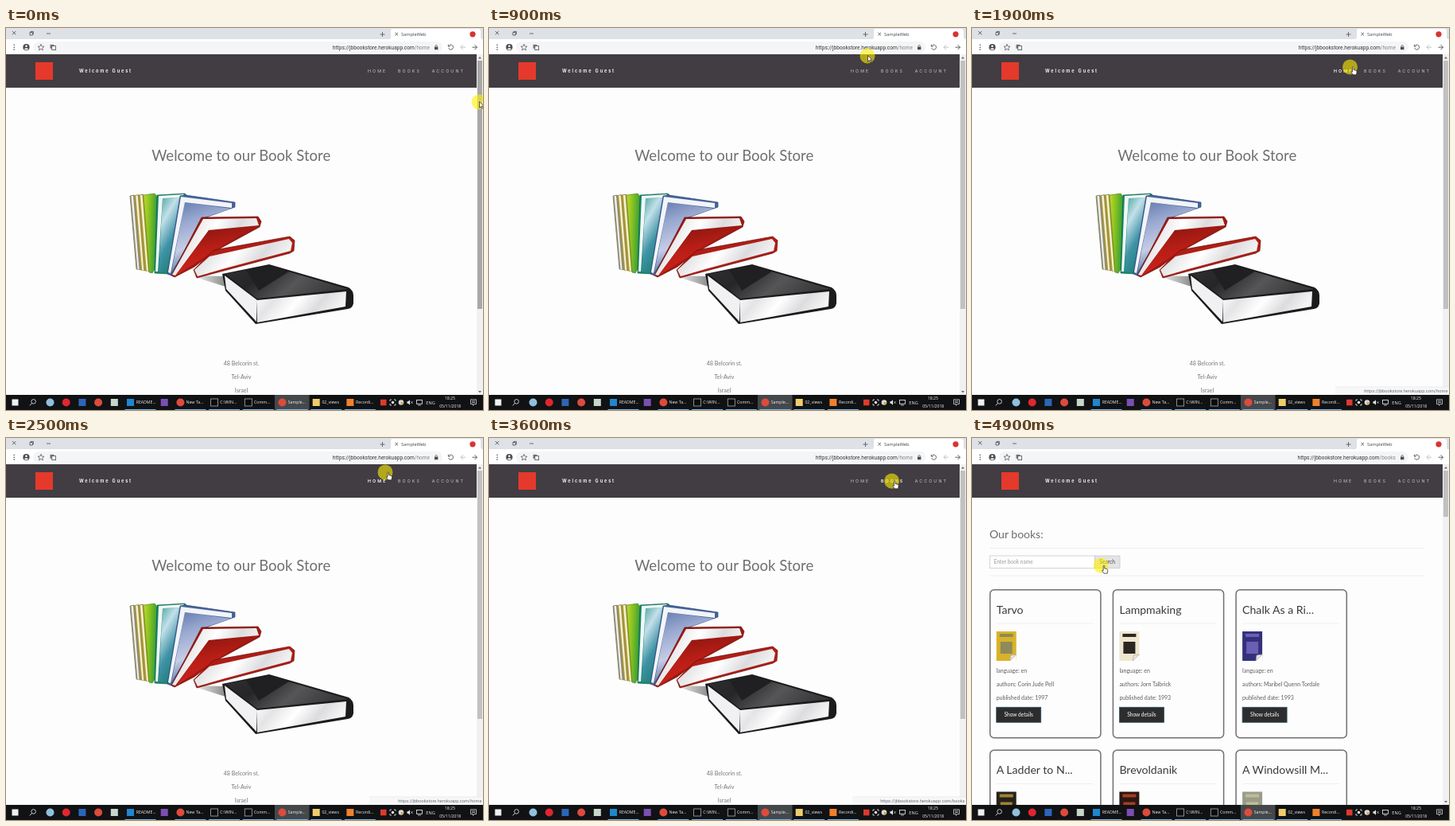
Recreate the animation shown at these times as an HTML page. Size 600x480 px, loop 5000 ms.

```html
<!DOCTYPE html>
<html lang="en">
<head>
<meta charset="utf-8">
<title>Book Store</title>
<style>
html, body { margin: 0; width: 100%; height: 100%; overflow: hidden; background: #fdfdfd; }
svg { display: block; width: 600px; height: 480px; }
text { font-family: Lato, sans-serif; }
.ui { font-family: "Open Sans", sans-serif; }
.url { font-family: Roboto, sans-serif; }
.nav { font-family: Inter, sans-serif; letter-spacing: 2.1px; }
.guest { font-family: Inter, sans-serif; letter-spacing: 1.9px; font-weight: 700; }
</style>
</head>
<body>
<svg id="stage" viewBox="0 0 600 480" xmlns="http://www.w3.org/2000/svg">
<defs id="paints"></defs>
<g id="home"></g>
<g id="books"></g>
<g id="frame"></g>
<g id="status"></g>
<g id="bar"></g>
<g id="pointer">
  <circle r="9.5" fill="#fff000" fill-opacity=".6"/>
  <path id="arrow" d="M.5 -.5V7.2L2.2 5.6L3.4 8.3L4.6 7.8L3.4 5.1H5.8Z" fill="#fff" stroke="#222" stroke-width=".7"/>
  <path id="hand" d="M3 .2Q4 -.8 4.6 .4V3.6L7.6 4.4Q8.8 4.8 8.6 6.2L8 9.8H3.8L1.2 6.2Q1.4 5.2 3 6.2Z" fill="#fff" stroke="#222" stroke-width=".7"/>
</g>
</svg>
<script>
const LOOP = 5000, STEP = 100, NAVIGATE = 4000, LOADED = 4500;
const HOST = "https://jbbookstore.herokuapp.com";
const $ = id => document.getElementById(id);

const attrs = o => Object.entries(o).map(([k, v]) => ` ${k}="${v}"`).join("");
const rect = (x, y, width, height, fill, more = {}) =>
  `<rect${attrs({ x, y, width, height, fill, ...more })}/>`;
const dot = (cx, cy, r, fill) => `<circle${attrs({ cx, cy, r, fill })}/>`;
const poly = (points, fill, stroke = "none") =>
  `<polygon${attrs({ points, fill, stroke, "stroke-width": 0.7 })}/>`;
const line = (d, stroke, width = 1) =>
  `<path${attrs({ d, stroke, fill: "none", "stroke-width": width })}/>`;
const text = (x, y, size, fill, str, more = {}) =>
  `<text${attrs({ x, y, "font-size": size, fill, ...more })}>${str}</text>`;
const edged = stroke => ({ stroke, "stroke-width": 0.8 });
const mid = { "text-anchor": "middle" };
const end = { "text-anchor": "end" };
const ui = { class: "ui" };

// Evenly spaced stops along the direction (x2, y2)
const gradient = (id, x2, y2, ...colors) =>
  `<linearGradient${attrs({ id, x2, y2 })}>` + colors.map((c, i) =>
    `<stop offset="${i / (colors.length - 1)}" stop-color="${c}"/>`).join("") + "</linearGradient>";

$("paints").innerHTML =
  gradient("lime", 1, 0.2, "#c6d92a", "#7fbe22", "#2f9a3a") +
  gradient("teal", 0.5, 1, "#3f9f96", "#c3e0ea", "#3f93a6", "#1f7f78") +
  gradient("blue", 0.3, 1, "#5f78ac", "#9aa9d0", "#c5cde6", "#54709f") +
  gradient("red", 0.3, 1, "#86160f", "#b81e16", "#cf241b") +
  gradient("page", 1, 0.3, "#fff", "#e4e4e6", "#fff", "#dcdcdf", "#f6f6f6") +
  gradient("black", 1, 0.3, "#303032", "#262628", "#565658", "#3a3a3c") +
  gradient("shade", 1, 0, "#fdfdfd", "#8b8b8b");

function thinBook(color, i) {
  const x = 156 + i * 5.7, y = 211 - i / 2, foot = 304 + i;
  return poly(`${x},${y} ${x + 5},${y - 1} ${x + 13},${foot} ${x + 8},${foot - 1}`, color, "#7c7440") +
    poly(`${x + 1.5},${y} ${x + 4},${y} ${x + 11.5},${foot} ${x + 9.5},${foot - 1}`, "#f3f1e2");
}

function bookPile() {
  return poly("232,311 275,312 276,325", "url(#shade)") +
    ["#8d9092", "#b9a02a", "#c4a71d"].map(thinBook).join("") +
    poly("173,210 187,208 191,213 189,300 184,308 180,307", "url(#lime)", "#4f8a1c") +
    poly("190,210 225,208 229,212 205,309 187,308", "#178a6d", "#0d5d4b") +
    poly("197,214 220,213 204,307 192,306", "url(#teal)") +
    poly("192,211 224,209 221,213 197,214 191,306 188,306", "#f1f7f6") +
    poly("219,211 226,210 288,219 288,225 254,237 208,311 203,309", "#46659c", "#2d4675") +
    poly("225,219 283,227 250,238 208,307", "url(#blue)") +
    poly("220,212 284,220 284,226 225,219 207,308 204,307", "#f2f4f8") +
    poly("246,238 317,237 321,243 319,250 262,281 237,300 212,313 208,311", "#a01912", "#5d0d09") +
    poly("254,254 308,252 262,280 214,311", "url(#red)") +
    poly("248,240 315,239 318,248 255,254 213,311 209,310", "url(#page)") +
    poly("262,279 357,262 363,267 362,280 357,283 240,314 236,304 255,285", "#b01d15", "#5d0d09") +
    poly("256,287 356,265 360,270 358,280 272,303 241,312 237,304", "url(#page)") +
    `<path d="M272 309L331 297L431 326Q437 330 437 336V346Q436 352 430 353L314 372L276 330Z" fill="#1b1b1c"/>` +
    poly("276,309 331,299 430,328 316,340", "url(#black)") +
    poly("302,304 331,299 356,306 318,330", "#202022") +
    poly("316,342 428,331 427,350 316,370", "url(#page)") +
    poly("275,311 316,342 315,369 277,328", "#f1f1f3");
}

function homePage() {
  return text(295.7, 167.3, 18.55, "#707070", "Welcome to our Book Store", mid) + bookPile() +
    ["48 Belcorin st.", "Tel-Aviv", "Israel"].map((s, i) =>
      text(296, 423.8 + i * 17.2, 7.1, "#777", s, mid)).join("");
}

const shelf = [
  { title: "Tarvo", by: "Corin Jude Pell", year: 1997, base: "#d8b32a", art: "#8f8a5a" },
  { title: "Lampmaking", by: "Jorn Talbrick", year: 1993, base: "#efe6cf", art: "#2b2622" },
  { title: "Chalk As a Ri...", by: "Maribel Quenn Tordale", year: 1993, base: "#35307c", art: "#6b5fb4" },
  { title: "A Ladder to N...", base: "#25221c", art: "#a08232" },
  { title: "Brevoldanik", base: "#2a1714", art: "#a83c24" },
  { title: "A Windowsill M...", base: "#9a9c8b", art: "#c0bd94" }
];

function cover({ base, art }, x, y) {
  const w = 25, h = 37, r = x + w, b = y + h;
  return rect(x, y, w, h, base) + rect(x + 4, y + 3, w - 8, 4, art) +
    rect(x + 5, y + 13, w - 10, 15, art) +
    poly([r, b - 8, r, b, r - 8, b], "#fdfdfd") +
    poly([r, b - 8, r - 7, b - 7, r - 8, b], "#e9e6dc", "#aaa");
}

function card(b, i) {
  const x = 22.7 + (i % 3) * 154.7, y = 190.7 + Math.floor(i / 3) * 201.5, left = x + 8;
  const facts = ["language: en", "authors: " + b.by, "published date: " + b.year];
  return rect(x, y, 139.2, 186, "#fdfdfd", { rx: 5, stroke: "#6f6f73", "stroke-width": 1.5 }) +
    text(left, y + 30.2, 14.1, "#3a3a3a", b.title) +
    rect(left, y + 42, 122, 0.7, "#e8e8e8") + cover(b, left, y + 52.3) +
    facts.map((s, n) => text(left, y + 104 + n * 17, 7, "#5c5c5c", s)).join("") +
    rect(left, y + 147.6, 56, 19, "#2d2d2e", edged("#2c5262")) +
    text(left + 28, y + 159.6, 6.6, "#fff", "Show details", mid);
}

function booksPage() {
  const rule = y => rect(22, y, 546, 0.7, "#e9e9e9");
  return text(22, 126, 14, "#6d6d6d", "Our books:") + rule(138) + rule(172.7) +
    rect(22.4, 148, 132, 15.4, "#fff", edged("#c8c8c8")) +
    text(27.5, 158.2, 6.6, "#999", "Enter book name") +
    rect(154.4, 148, 31.6, 15.4, "#ebebeb", { id: "find", ...edged("#c8c8c8") }) +
    text(170.2, 158, 6.7, "#444", "Search", mid) +
    `<g id="cards">${shelf.map(card).join("")}</g>`;
}

const cross = (x, y, r, width) =>
  line(`M${x - r} ${y - r}l${2 * r} ${2 * r}m0 ${-2 * r}l${-2 * r} ${2 * r}`, "#444", width);

// Horizontal arrow pointing along dir (1 or -1)
const arrow = (x, dir, color) =>
  line(`M${x - 3 * dir} 24.2h${6 * dir}m${-3 * dir} -3l${3 * dir} 3l${-3 * dir} 3`, color, 0.9);

function star(cx, cy, r) {
  const at = i => {
    const a = i * Math.PI / 5, d = i % 2 ? r * 0.45 : r;
    return [cx + d * Math.sin(a), cy - d * Math.cos(a)];
  };
  return poly(Array.from({ length: 10 }, (_, i) => at(i)).join(" "), "none", "#4a4d51");
}

function browser() {
  const ink = "#4a4d51";
  return rect(0, 0, 600, 14, "#dee1e6") +
    `<path d="M482 14Q484 14 484 11V3Q484 1 487 1H594Q597 1 597 4V11Q597 14 599 14Z" fill="#fff"/>` +
    rect(0, 14, 600, 19, "#fff") + rect(34, 17, 515, 14, "#f4f5f6", { rx: 7 }) +
    cross(10.2, 6.2, 2.2, 0.8) + cross(491.2, 7.6, 1.8, 0.8) +
    line("M30 5.5H33.3V9H30ZM31 5.5V4.4H34.4V7.8H33.3M51 7H56M470.5 8H476.5M473.5 5V11", ink, 0.8) +
    text(497, 10, 5.7, "#44474b", "SampleWeb", ui) + dot(587, 7.8, 3.6, "#d7342f") +
    [-1, 0, 1].map(i => dot(10.2, 24.2 + i * 2.9, 0.8, ink)).join("") +
    dot(25.5, 24.2, 4.1, ink) + dot(25.5, 22.8, 1.3, "#fff") +
    `<path d="M22.8 26.5Q25.5 23.8 28.2 26.5Q25.5 28.6 22.8 26.5Z" fill="#fff"/>` +
    star(44, 24.5, 4.2) +
    rect(55.5, 20.8, 4.8, 5, "#777") + rect(57.8, 22.6, 4.8, 5, "#fff", edged(ink)) +
    text(533, 26.6, 6.55, "#33363a", "", { ...end, class: "url", id: "address" }) +
    rect(539, 23.6, 4.4, 3.6, ink) + line("M540 23.6V22.2Q541.2 20.6 542.4 22.2V23.6", ink, 0.7) +
    line("M557 22.5A3 3 0 1 1 556.7 25.2M556.4 20.8V23.2H558.8", ink, 0.9) +
    arrow(575, -1, "#b9bbbe") + arrow(589.5, 1, ink);
}

const links = [
  { label: "HOME", x: 455, w: 24, path: "/home" },
  { label: "BOOKS", x: 493, w: 28, path: "/books" },
  { label: "ACCOUNT", x: 535.7, w: 39, path: "/account" }
];

function header() {
  return rect(0, 33, 592, 42, "#413d43") + rect(37, 43, 22, 22, "#e5392c") +
    text(92, 56, 5.5, "#f2f2f2", "Welcome Guest", { class: "guest" }) +
    links.map((l, i) => text(l.x, 56.2, 5.3, "#c9c7ca", l.label, { class: "nav", id: "link" + i })).join("");
}

function scrollbar() {
  return rect(592, 33, 8, 428, "#f1f1f1") + rect(593, 41, 6, 312, "#c1c1c1", { id: "thumb" }) +
    poly("594,38.4 598,38.4 596,36", "#666") + poly("594,456 598,456 596,458.4", "#666");
}

// Entries sit side by side; a labelled one is wider
const apps = [
  { fill: "#8fc1dc", round: true }, { fill: "#e0262f", round: true }, { fill: "#2b66b8" },
  { fill: "#dd4b3c", round: true }, { fill: "#c8d7cc" },
  { fill: "#1f86cf", label: "README..." }, { fill: "#7c4fb3" },
  { fill: "#dd4b3c", round: true, label: "New Ta..." },
  { fill: "#0c0c0c", label: "C:\\WIN..." }, { fill: "#0c0c0c", label: "Comm..." },
  { fill: "#dd4b3c", round: true, label: "Sample...", active: true },
  { fill: "#f0cd6b", label: "02_views" }, { fill: "#f0812b", label: "Recordi..." }
];

function taskbar() {
  const white = "#f0f0f0";
  let x = 55.5;
  const app = ({ fill, round, label, active }) => {
    const icon = round ? dot(x, 470.5, 5, fill)
      : rect(x - 4.5, 466, 9, 9, fill, fill === "#0c0c0c" ? edged("#aaa") : {});
    const part = (active ? rect(x - 9.5, 461, 43.5, 19, "#45484b") : "") + icon +
      (label ? text(x + 7.2, 472.4, 5.2, white, label, ui) + rect(x - 7, 479, 39, 1, "#76b9ed") : "");
    x += label ? 42.7 : 20.2;
    return part;
  };
  const note = (cx, y, size, s) => text(cx, y, size, white, s, { ...ui, ...mid });
  return rect(0, 461, 600, 19, "#111214") + rect(7.5, 466.5, 8, 8, white) +
    rect(31.8, 466.6, 5.6, 5.6, "none", { rx: 2.8, ...edged(white) }) + line("M32.6 471.5L29.8 474.4", white, 0.9) +
    apps.map(app).join("") +
    rect(471, 466.8, 7.5, 7.5, "#dd3a2c") +
    rect(483, 467, 7, 7, "none", { "stroke-dasharray": "2 3 2 0", ...edged(white) }) + dot(486.5, 470.5, 1.7, white) +
    dot(497, 470.5, 3.3, "#d9d9d9") + dot(498.2, 471.5, 1.4, "#d89a2c") +
    poly("504.5,469.3 506,469.3 508,467.3 508,473.7 506,471.7 504.5,471.7", white) +
    line("M509.3 469.3l2.4 2.4m0 -2.4l-2.4 2.4M518 474H522", white, 0.7) +
    rect(516.5, 467.5, 7, 4.8, "none", edged(white)) +
    note(534, 472.5, 5.6, "ENG") + note(558.3, 467.3, 5.2, "18:25") + note(558.7, 476.8, 5.1, "05/11/2018") +
    line("M584.5 466.8H591.5V472.6H589L587.5 474.4V472.6H584.5ZM586 468.8H590M586 470.6H590", white, 0.7);
}

$("home").innerHTML = homePage();
$("books").innerHTML = booksPage();
$("frame").innerHTML = browser() + header() + scrollbar();
$("status").innerHTML = rect(457, 451, 143, 10, "#f7f7f8") + rect(457, 450.7, 143, 0.5, "#dcdde0") +
  text(598.5, 458, 5.65, "#6b6e73", "", { ...end, class: "url", id: "hint" });
$("bar").innerHTML = taskbar();

// Pointer stops: time, x, y
const stops = [
  [0, 595, 93], [900, 476, 35], [1200, 476, 38], [1900, 475.5, 49], [2500, 477, 43],
  [3200, 506, 54], [3900, 507, 54], [4200, 256, 145], [LOOP, 158, 161]
];

function pointerAt(t) {
  const i = stops.findIndex(s => s[0] > t);
  const [t0, x0, y0] = stops[i - 1], [t1, x1, y1] = stops[i];
  const k = (t - t0) / (t1 - t0), ease = k * k * (3 - 2 * k);
  return [x0 + (x1 - x0) * ease, y0 + (y1 - y0) * ease];
}

const show = (id, on) => $(id).setAttribute("display", on ? "inline" : "none");

function draw(ms) {
  const t = Math.floor((ms % LOOP) / STEP) * STEP;
  const [x, y] = pointerAt(t);
  const onBooks = t >= NAVIGATE, loaded = t >= LOADED;
  const hot = links.find(l => y > 40 && y < 68 && x > l.x - 5 && x < l.x + l.w + 5);
  const onFind = onBooks && x > 154 && x < 186 && y > 148 && y < 163.5;

  show("home", !onBooks);
  show("books", onBooks);
  show("cards", loaded);
  show("status", hot);
  if (hot) $("hint").textContent = HOST + hot.path;
  $("address").innerHTML = HOST + `<tspan fill="#85888c">${onBooks ? "/books" : "/home"}</tspan>`;

  links.forEach((l, i) => {
    $("link" + i).setAttribute("fill", l === hot ? "#fff" : "#c9c7ca");
    $("link" + i).setAttribute("font-weight", l === hot ? 600 : 400);
  });
  $("find").setAttribute("fill", onFind ? "#e4e4e4" : "#ebebeb");
  $("thumb").setAttribute("height", loaded ? 58 : 312);
  $("thumb").setAttribute("fill", x > 591 ? "#a8a8a8" : "#c1c1c1");

  $("pointer").setAttribute("transform", `translate(${x.toFixed(2)} ${y.toFixed(2)})`);
  show("hand", hot || onFind);
  show("arrow", !hot && !onFind);
}

const begin = performance.now();
function tick() {
  draw(performance.now() - begin);
  requestAnimationFrame(tick);
}
tick();
</script>
</body>
</html>
```
